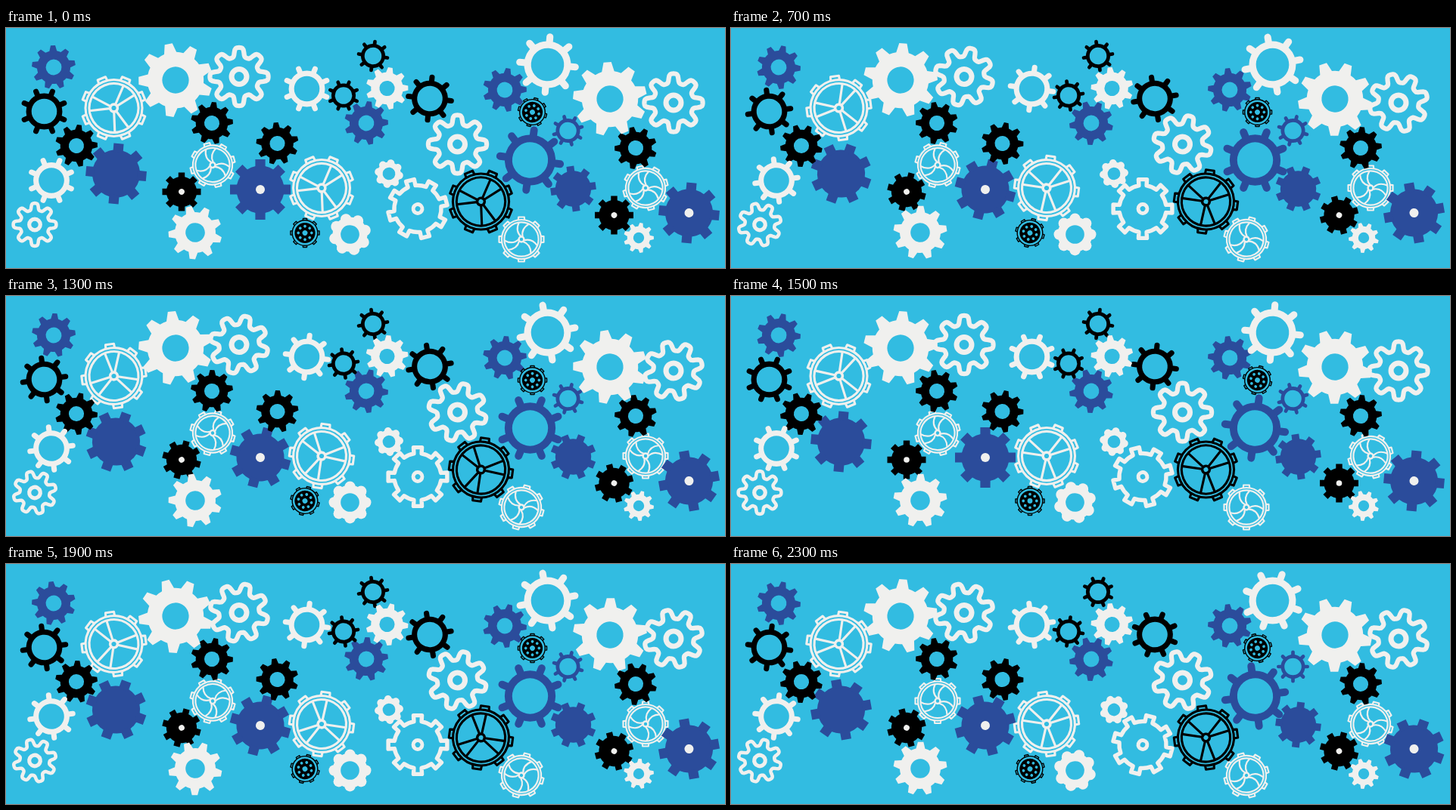
Recreate the animation shown at these times as an HTML page with a canvas. Size 950 by 318 pixels, loop 2.4 s.

```html
<!DOCTYPE html>
<html>
<head>
<meta charset="utf-8">
<title>Turning gears</title>
<style>
html, body { margin: 0; width: 950px; height: 318px; overflow: hidden; background: #32bce1; }
canvas { display: block; }
</style>
</head>
<body>
<canvas id="stage" width="950" height="318"></canvas>
<script>
const c = document.getElementById('stage').getContext('2d');
const SKY = '#32bce1', WHITE = '#f0f0ee', BLACK = '#000', BLUE = '#2b4c9b';
const TAU = Math.PI * 2, DEG = TAU / 360;
const gears = [];

// Each place is x, y and a lead angle; the sign of the lead is the turning direction
const add = (draw, color, R, ...places) =>
  places.forEach(([x, y, lead]) => gears.push({ draw, color, R, x, y, lead }));

const polar = (r, a) => [r * Math.sin(a), -r * Math.cos(a)];

function repeat(n, fn) {
  for (let i = 0; i < n; i++) fn(i * TAU / n);
}

function dot(r, x = 0, y = 0) {
  c.moveTo(x + r, y);
  c.arc(x, y, r, 0, TAU);
}

function ring(r, w) {
  c.lineWidth = w;
  c.beginPath();
  dot(r);
  c.stroke();
}

function disc(r, x, y) {
  c.beginPath();
  dot(r, x, y);
  c.fill();
}

// Closed outline of n teeth; top and base are half widths as parts of one pitch
function teeth(n, R, root, top, base) {
  const pitch = TAU / n, up = TAU / 4;
  c.beginPath();
  repeat(n, a => {
    c.lineTo(...polar(root, a - base * pitch));
    c.lineTo(...polar(R, a - top * pitch));
    c.lineTo(...polar(R, a + top * pitch));
    c.arc(0, 0, root, a + base * pitch - up, a + (1 - base) * pitch - up);
  });
  c.closePath();
}

function bars(r1, r2, w, cap) {
  c.lineWidth = w;
  c.lineCap = cap;
  c.beginPath();
  repeat(8, a => {
    c.moveTo(...polar(r1, a));
    c.lineTo(...polar(r2, a));
  });
  c.stroke();
}

// Double rim with hollow caps standing on it
function rim(R) {
  c.lineWidth = R * .07;
  c.beginPath();
  repeat(8, a => {
    c.moveTo(...polar(R * .84, a - .16));
    c.lineTo(...polar(R * .96, a - .13));
    c.lineTo(...polar(R * .96, a + .13));
    c.lineTo(...polar(R * .84, a + .16));
  });
  c.stroke();
  ring(R * .84, R * .07);
}

function star(R) {
  teeth(9, R, R * .76, .15, .32);
  dot(R * .36);
  c.fill('evenodd');
}

function knobs(R) {
  ring(R * .635, R * .22);
  bars(R * .7, R * .89, R * .22, 'round');
}

function block(R) {
  disc(R * .79);
  bars(R * .7, R, R * .33, 'butt');
}

function hubBlock(R) {
  block(R);
  c.fillStyle = WHITE;
  disc(R * .15);
}

function lobes(R) {
  c.lineWidth = R * .15;
  c.beginPath();
  repeat(160, a => c.lineTo(...polar(R * (.785 + .15 * Math.tanh(2 * Math.cos(8 * a))), a)));
  c.closePath();
  c.stroke();
  ring(R * .24, R * .17);
}

function flower(R) {
  ring(R * .63, R * .38);
  repeat(8, a => disc(R * .26, ...polar(R * .74, a)));
}

function cog(R) {
  c.lineWidth = R * .13;
  teeth(8, R * .935, R * .74, .18, .21);
  c.stroke();
  ring(R * .14, R * .12);
}

// Three arms of two lines each, bent sideways by the given angle
function wheel(R, turn, bend) {
  rim(R);
  ring(R * .73, R * .07);
  c.beginPath();
  repeat(3, a => [-.3, .3].forEach(side => {
    const mid = a + turn * DEG;
    c.moveTo(...polar(R * .12, mid + side));
    c.quadraticCurveTo(...polar(R * .45, mid + side - bend), ...polar(R * .73, mid + side));
  }));
  c.stroke();
  ring(R * .11, R * .08);
}

const spokes = R => wheel(R, -102, 0);
const swirl = R => wheel(R, 9, .5);

function dots(R) {
  rim(R);
  c.beginPath();
  dot(R * .68);
  dot(R * .17);
  repeat(8, a => dot(R * .095, ...polar(R * .44, a)));
  c.fill('evenodd');
}

add(spokes, WHITE, 44.5, [142.5, 106, 22.5], [417, 212, -337.5]);
add(swirl, WHITE, 31, [273, 181.5, -15], [845, 212, 345], [681, 280, 360]);
add(block, BLUE, 40, [145.5, 193, 5]);
add(block, BLUE, 30, [749.5, 213, -8]);
add(hubBlock, BLUE, 40, [336, 214, 45], [902.5, 245, -40]);
add(hubBlock, BLACK, 25.5, [232, 217, 45], [803.5, 248, -45]);
add(star, BLUE, 29, [63, 52, -2], [476, 126, -32], [659, 82, 9]);
add(star, BLACK, 28, [93, 156, -32], [272, 126, 6], [358.5, 153, -4], [832, 159, -11]);
add(knobs, BLACK, 32, [50.5, 110.5, 22.5], [560, 93.5, -39]);
add(knobs, BLACK, 21.5, [485, 37, -37.5], [446, 89.5, 22.5]);
add(knobs, BLUE, 45, [692.5, 175, 7.5]);
add(knobs, BLUE, 21.5, [742.5, 136, -15]);
add(knobs, WHITE, 32, [60, 202, 22.5], [397.5, 80.5, -22.5]);
add(knobs, WHITE, 41.5, [715.5, 48.5, -40]);
add(star, WHITE, 49, [224, 69, -11], [798, 94, 36]);
add(star, WHITE, 35.5, [250, 271, -14]);
add(star, WHITE, 28, [503.5, 80, 9]);
add(star, WHITE, 20, [836, 278, -30]);
add(lobes, WHITE, 41.5, [308, 64.5, 45], [882, 99, -45], [596.5, 154, 45]);
add(lobes, WHITE, 30.5, [38, 260.5, -45]);
add(flower, WHITE, 28, [454.5, 273.5, 30]);
add(flower, WHITE, 19, [506, 193, -35]);
add(cog, WHITE, 42, [544, 239.5, 30]);
add(spokes, BLACK, 44, [627.5, 230, -337.5]);
add(dots, BLACK, 20, [395, 271.5, 45], [695.5, 111.5, -30]);

function frame() {
  // One full turn per loop, in 24 steps
  const turn = Math.floor(performance.now() % 2400 / 100) * 15;
  c.fillStyle = SKY;
  c.fillRect(0, 0, 950, 318);
  for (const g of gears) {
    c.save();
    c.translate(g.x, g.y);
    c.rotate((g.lead + Math.sign(g.lead) * turn) * DEG);
    c.fillStyle = c.strokeStyle = g.color;
    c.lineJoin = 'round';
    g.draw(g.R);
    c.restore();
  }
  requestAnimationFrame(frame);
}
frame();
</script>
</body>
</html>
```
